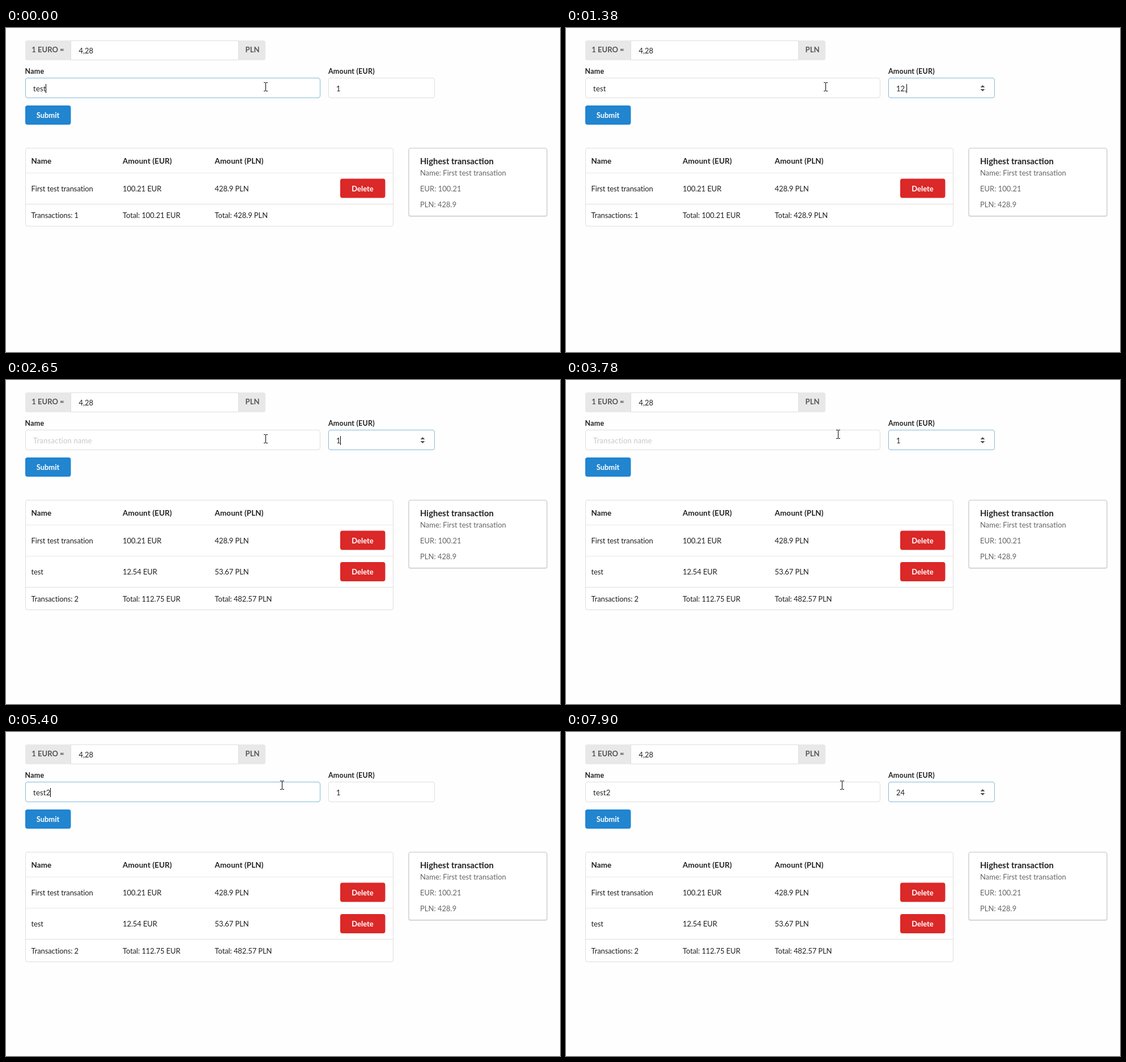
Recreate the animation shown at these times as an HTML page. Size 978 by 573 pixels, loop 8 s.

```html
<!DOCTYPE html>
<html lang="en">
<head>
<meta charset="utf-8">
<title>Transactions</title>
<style>
  html, body { margin: 0; height: 100%; overflow: hidden; background: #fefefe; }
  svg { display: block; width: 978px; height: 573px; }
  text { font: 13px Lato, sans-serif; fill: #212121; white-space: pre; }
  .bold { font-weight: 700; font-size: 13.4px; letter-spacing: .15px; }
  .label { font-weight: 700; font-size: 12.5px; letter-spacing: .2px; }
  .title { font-weight: 700; font-size: 14.9px; }
  .button { font-weight: 700; fill: #fff; text-anchor: middle; }
  .addon { font-weight: 700; fill: #555; text-anchor: middle; }
  .meta { fill: #666; }
  .cell { letter-spacing: -.1px; }
  #name { letter-spacing: .25px; }
  .box { fill: #fff; stroke: #dededf; }
  .line { stroke: #e8e9e9; }
  .edge { stroke: #dededf; }
</style>
</head>
<body>
<svg viewBox="0 0 978 573">
  <rect x="34" y="22" width="424" height="35" rx="4" fill="#e8e8e8"/>
  <rect class="box" x="114.5" y="22.5" width="296" height="34"/>
  <text class="addon" x="74" y="43">1 EURO =</text>
  <text x="128.5" y="45">4,28</text>
  <text class="addon" x="435" y="43">PLN</text>

  <text class="label" x="33.5" y="80.5">Name</text>
  <text class="label" x="569" y="80.5">Amount (EUR)</text>
  <rect id="nameBox" class="box" x="34.5" y="88.5" width="520" height="35" rx="3.5"/>
  <rect id="amountBox" class="box" x="569.5" y="88.5" width="187" height="35" rx="3.5"/>
  <rect id="selection" x="583" y="99" width="7.5" height="16" fill="#c8c8c8"/>
  <text id="name" x="48" y="111.5"></text>
  <text id="amount" x="583" y="111.5"></text>
  <path id="spinner" d="M731.5 105L735.5 101L739.5 105ZM731.5 108L735.5 112L739.5 108Z" fill="#505050"/>
  <rect id="caret" y="99" width="1" height="16" fill="#000"/>

  <rect x="34" y="137" width="80.5" height="34" rx="4" fill="#2185d0"/>
  <text class="button" x="74" y="158.5">Submit</text>

  <rect id="table" class="box" x="34.5" y="212.5" width="649" rx="3.5"/>
  <path class="line" d="M35 256.5H683"/>
  <g id="rows"></g>

  <rect x="710" y="213" width="246" height="121" rx="4" fill="#e2e2e3"/>
  <rect x="711" y="212.5" width="244" height="120" rx="4" fill="#fff" stroke="#d4d4d5" stroke-width="1.5"/>
  <text class="title" x="731" y="240.5">Highest transaction</text>
  <text class="meta" x="731" y="261">Name: First test transation</text>
  <text class="meta" x="731" y="288.5">EUR: 100.21</text>
  <text class="meta" x="731" y="316.5">PLN: 428.9</text>

  <path id="pointer" d="M-3.5 -7.5H-.5M.5 -7.5H3.5M0 -7V7M-3.5 7.5H-.5M.5 7.5H3.5" fill="none" stroke="#000"/>
</svg>
<script>
const $ = id => document.getElementById(id);
const LOOP = 8000;
const GREY = '#dededf', BLUE = '#85b7d9';

// [start ms, changes]; caret: is it lit, sel: is the amount selected
const steps = [
  [0, { name: 'test', amount: '1', focus: 'name', caret: 1, sel: 0, sent: 0, x: 458.5, y: 104 }],
  [270, { focus: 'amount', caret: 0, sel: 1 }],
  [830, { caret: 1, sel: 0 }],
  [950, { amount: '12' }],
  [1380, { amount: '12,' }],
  [1690, { amount: '12,5' }],
  [1840, { amount: '12,54' }],
  [2370, { caret: 0 }],
  [2650, { name: '', amount: '1', caret: 1, sent: 1 }],
  [3080, { caret: 0 }],
  [3660, { x: 468.5, y: 100 }],
  [3780, { x: 480.5, y: 96 }],
  [3900, { focus: 'name', caret: 1, x: 487.5, y: 94 }],
  [4420, { caret: 0 }],
  [4850, { name: 't', caret: 1 }],
  [4970, { name: 'tes' }],
  [5100, { name: 'test' }],
  [5400, { name: 'test2' }],
  [5700, { focus: 'amount', caret: 0, sel: 1 }],
  [7030, { amount: '2', caret: 1, sel: 0 }],
  [7500, { amount: '24' }],
  [7900, { caret: 0 }]
];

const cells = (y, words, kind = 'cell') => words.map((word, i) =>
  `<text class="${kind}" x="${[44.5, 206, 368.5][i]}" y="${y}">${word}</text>`).join('');

function tableRows(sent) {
  const data = [['First test transation', '100.21 EUR', '428.9 PLN']];
  if (sent) data.push(['test', '12.54 EUR', '53.67 PLN']);
  const rows = data.map((words, i) => {
    const y = 256 + i * 55.4, last = i === data.length - 1;
    return cells(y + 32.5, words) +
      `<rect x="590" y="${y + 10.5}" width="79.5" height="34" rx="4" fill="#db2828"/>
       <text class="button" x="629.5" y="${y + 32.5}">Delete</text>
       <path class="${last ? 'edge' : 'line'}" d="M35 ${Math.floor(y + 55) + 0.5}H683"/>`;
  });
  const totals = sent
    ? ['Transactions: 2', 'Total: 112.75 EUR', 'Total: 482.57 PLN']
    : ['Transactions: 1', 'Total: 100.21 EUR', 'Total: 428.9 PLN'];
  return cells(239.5, ['Name', 'Amount (EUR)', 'Amount (PLN)'], 'bold') +
    rows.join('') + cells(sent ? 391.5 : 336, totals);
}

function show(state) {
  const onName = state.focus === 'name';
  $('name').textContent = state.name || 'Transaction name';
  $('name').style.fill = state.name ? '' : onName ? '#878787' : '#c7c7c7';
  $('amount').textContent = state.amount;
  $('nameBox').style.stroke = onName ? BLUE : GREY;
  $('amountBox').style.stroke = onName ? GREY : BLUE;
  $('spinner').style.opacity = onName ? 0 : 1;
  $('selection').style.opacity = state.sel;
  $('caret').style.opacity = state.caret;
  const typed = state[state.focus] ? $(state.focus).getComputedTextLength() : 0;
  $('caret').setAttribute('x', Math.floor((onName ? 48 : 583) + typed));
  $('pointer').setAttribute('transform', `translate(${state.x} ${state.y})`);
  $('table').setAttribute('height', state.sent ? 194 : 138);
  $('rows').innerHTML = tableRows(state.sent);
}

let shown = -1;
function tick() {
  const t = performance.now() % LOOP;
  const count = steps.filter(([start]) => start <= t).length;
  if (count !== shown) {
    show(Object.assign({}, ...steps.slice(0, count).map(step => step[1])));
    shown = count;
  }
  requestAnimationFrame(tick);
}
tick();
</script>
</body>
</html>
```
